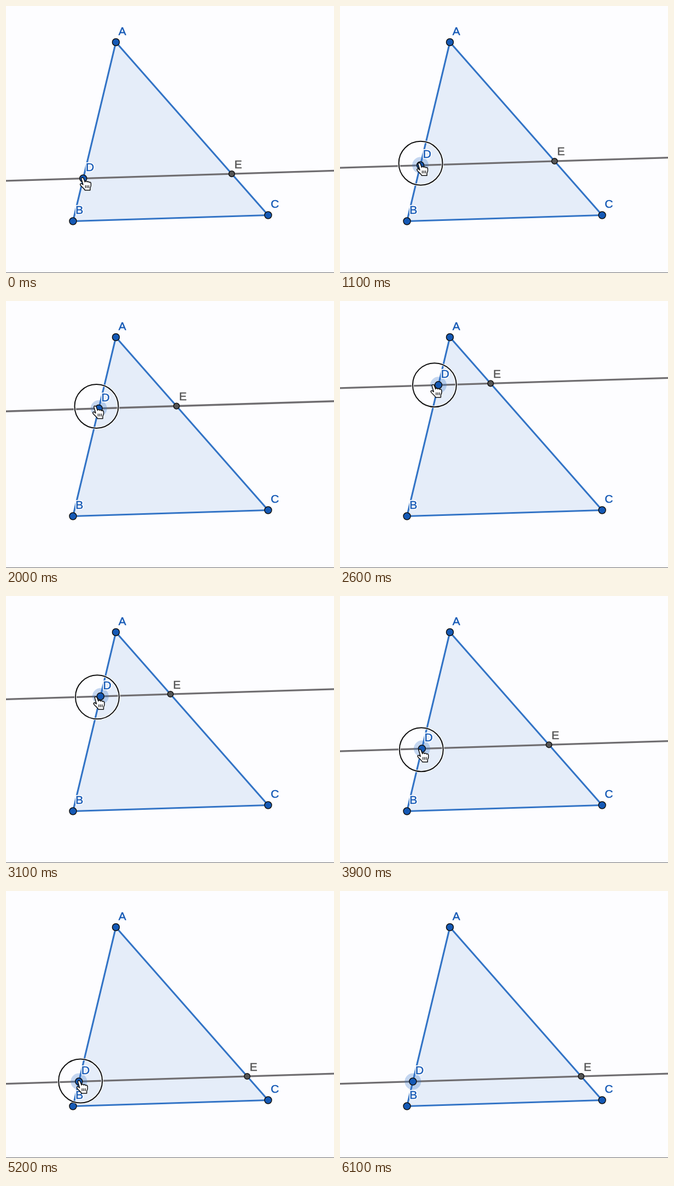
These frames come from a looping animation (600 by 487 pixels, 6800 ms). An HTML page with a canvas:

```html
<!DOCTYPE html>
<html lang="en">
<head>
<meta charset="utf-8">
<title>Parallel line in a triangle</title>
<style>
  html, body { margin: 0; height: 100%; overflow: hidden; background: #fdfdff; }
  canvas { display: block; }
</style>
</head>
<body>
<canvas id="stage" width="600" height="487"></canvas>
<script>
const ctx = document.getElementById('stage').getContext('2d');
const LOOP = 6800, STEP = 100;
const PRESS = 100, RELEASE = 5400, GONE = 5600, LEAD = 30;
const PAPER = '#fdfdff', INK = '#111', BLUE = '#1559b5', GRAY = '#555';

const A = { x: 201, y: 66 }, B = { x: 122.5, y: 392.5 }, C = { x: 479.5, y: 381.5 };
const EXIT = { x: 235, y: 10 };
const slope = (C.y - B.y) / (C.x - B.x);

// Height of D while dragged: [time, y]
const drag = [[800, 314.5], [1100, 290.5], [2000, 196], [2500, 152],
  [3100, 183], [3900, 278.5], [4600, 329.5], [5200, 347.5]];

const hand = new Path2D('M-3.5 2.5C-4.2-.2-1-1.2.5 1.5L3 8C3.5 6 6 6 7 8C8 6.5 10 7 10.5 8.8' +
  'C12 7.6 14 8.5 14 11C14.6 14 14 16 12.5 18.8V23H3C2 20-2 18-5 14C-7 11.5-4.5 10-2.5 11.5L-.5 13Z');
const creases = new Path2D('M4 14v5M7 14v5M10 14v5');

// Monotone cubic interpolation through the keys
function curve(keys, t) {
  const last = keys.length - 1;
  if (t <= keys[0][0]) return keys[0][1];
  if (t >= keys[last][0]) return keys[last][1];
  const rate = i => (keys[i + 1][1] - keys[i][1]) / (keys[i + 1][0] - keys[i][0]);
  const tangent = i => {
    if (i === 0 || i === last) return 0;
    const a = rate(i - 1), b = rate(i);
    return a * b > 0 ? 2 * a * b / (a + b) : 0;
  };
  const i = keys.findIndex(k => k[0] > t) - 1;
  const [t0, v0] = keys[i], [t1, v1] = keys[i + 1];
  const h = t1 - t0, u = (t - t0) / h, w = 1 - u;
  return v0 * w * w * (1 + 2 * u) + v1 * u * u * (3 - 2 * u) +
    h * u * w * (tangent(i) * w - tangent(i + 1) * u);
}

const along = (p, q, s) => ({ x: p.x + (q.x - p.x) * s, y: p.y + (q.y - p.y) * s });

// The mouse runs a little ahead of D, on a slightly steeper straight path
function mouseAt(t) {
  const y = curve(drag, t + LEAD) - 1;
  return { x: 202 - 0.19 * y, y };
}

function stroke(color, width, path) {
  ctx.strokeStyle = color;
  ctx.lineWidth = width;
  path ? ctx.stroke(path) : ctx.stroke();
}

function circle(p, r) {
  ctx.beginPath();
  ctx.arc(p.x, p.y, r, 0, 2 * Math.PI);
}

function disc(p, r, color) {
  circle(p, r);
  ctx.fillStyle = color;
  ctx.fill();
}

function point(p, r, color) {
  disc(p, r, color);
  stroke(INK, 1.5);
}

function label(text, p, color, lift = 13.5) {
  const x = p.x + 4.7, y = p.y - lift;
  const outline = (style, width) => {
    ctx.strokeStyle = style;
    ctx.lineWidth = width;
    ctx.strokeText(text, x, y);
  };
  outline(PAPER, 4);
  outline(color, 0.5);
  ctx.fillStyle = color;
  ctx.fillText(text, x, y);
}

function cursor(p) {
  ctx.save();
  ctx.translate(p.x - 1, p.y - 0.5);
  ctx.fillStyle = '#fff';
  ctx.fill(hand);
  stroke(INK, 1.5, hand);
  stroke(INK, 1.3, creases);
  ctx.restore();
}

function draw(t) {
  const s = (curve(drag, t) - A.y) / (B.y - A.y);
  const D = along(A, B, s), E = along(A, C, s);
  const mouse = mouseAt(t);

  ctx.fillStyle = PAPER;
  ctx.fillRect(0, 0, 600, 487);
  ctx.fillStyle = '#6c6c70';
  ctx.fillRect(0, 486, 600, 1);
  ctx.lineJoin = 'round';
  ctx.font = '21px "Liberation Sans", Arial, sans-serif';

  ctx.beginPath();
  for (const p of [A, B, C]) ctx.lineTo(p.x, p.y);
  ctx.closePath();
  ctx.fillStyle = '#e5edf9';
  ctx.fill();
  stroke('#3374c6', 3.2);

  ctx.beginPath();
  for (const x of [0, 600]) ctx.lineTo(x, D.y + slope * (x - D.x));
  stroke('#706e71', 3.3);

  if (t >= PRESS) disc(D, 15, 'rgba(50,115,200,.28)');
  for (const p of [A, B, C, D]) point(p, 6.5, BLUE);
  point(E, 5.3, GRAY);

  Object.entries({ A, B, C, D }).forEach(([name, p]) => label(name, p, BLUE));
  label('E', E, GRAY, 10.5);

  // Press ring
  if (t >= PRESS && t < RELEASE) {
    ctx.globalAlpha = Math.min(1, t / 300);
    circle(mouse, 40);
    stroke(PAPER, 4);
    stroke(INK, 2);
    ctx.globalAlpha = 1;
  }

  const leave = Math.min(1, Math.max(0, (t - RELEASE + STEP) / (2 * STEP)));
  if (t < GONE) cursor(along(mouse, EXIT, leave));
}

const start = performance.now();
function frame() {
  const t = (performance.now() - start) % LOOP;
  draw(Math.floor(t / STEP) * STEP);
  requestAnimationFrame(frame);
}
frame();
</script>
</body>
</html>
```
